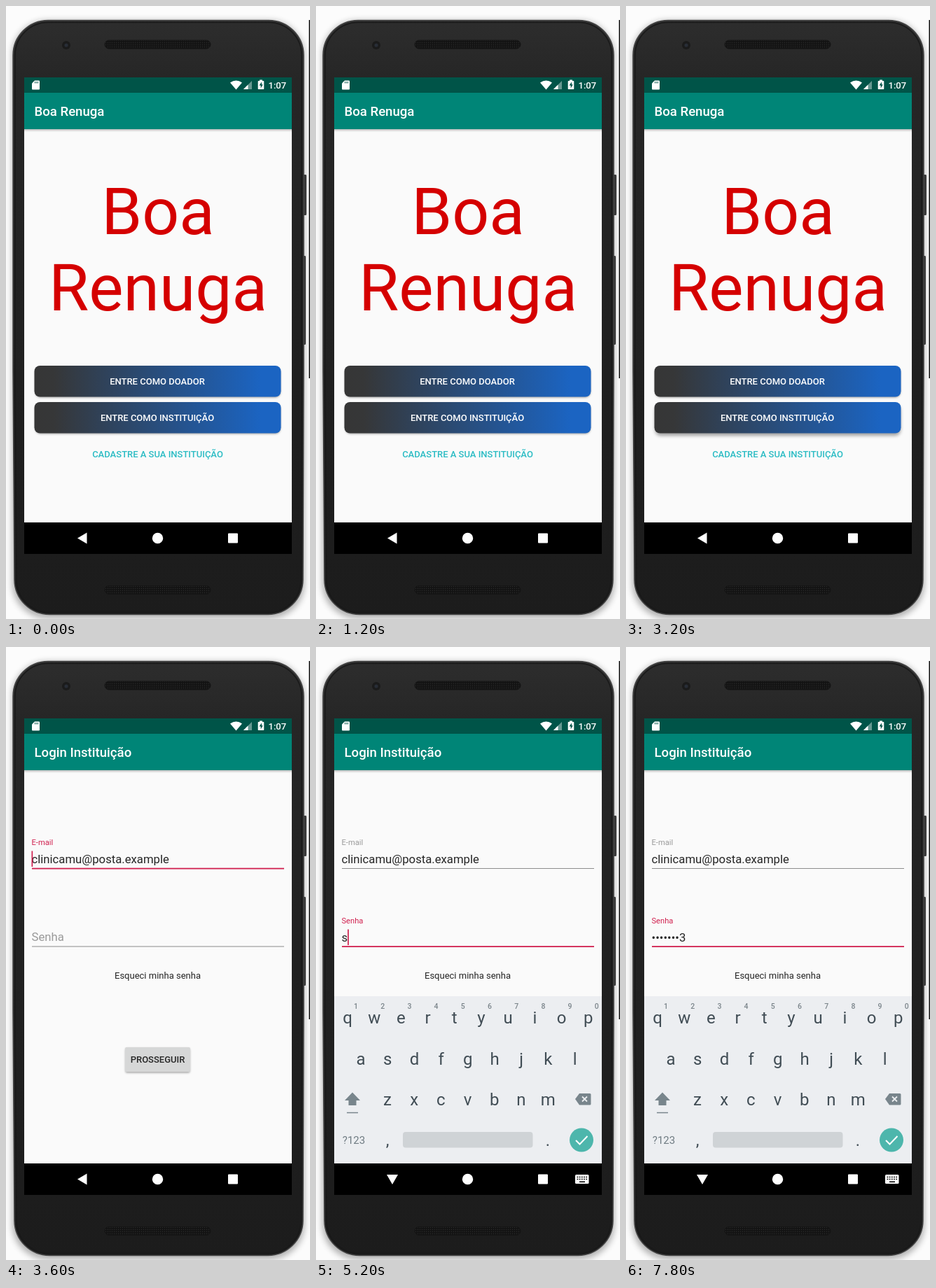
Recreate the animation shown at these times as an HTML page. Size 434x876 px, loop 8000 ms.

```html
<!DOCTYPE html>
<html lang="pt">
<head>
<meta charset="utf-8">
<title>Boa Renuga</title>
<style>
  html, body { margin: 0; width: 100%; height: 100%; overflow: hidden; background: #fcfcfc; }
  svg { display: block; width: 100vw; height: 100vh; font-family: Roboto, sans-serif; }
  text { white-space: pre; }
  .mid { text-anchor: middle; }
  .bold { font-weight: 500; }
  .btn { font-size: 13px; font-weight: 500; text-anchor: middle; }
  .label { font-size: 11.15px; }
  .field { font-size: 16.7px; fill: #252525; }
  .key { font-size: 24px; fill: #414d55; text-anchor: middle; }
  .hint { font-size: 10.5px; font-weight: 500; fill: #7b858b; text-anchor: middle; }
</style>
</head>
<body>
<svg viewBox="0 0 434 876">
  <defs>
    <linearGradient id="body" x1="0" y1="0" x2="0" y2="1">
      <stop offset="0" stop-color="#2d2d2d"/>
      <stop offset=".1" stop-color="#262626"/>
      <stop offset=".6" stop-color="#202020"/>
      <stop offset="1" stop-color="#1c1c1c"/>
    </linearGradient>
    <linearGradient id="blue">
      <stop offset="0" stop-color="#363636"/>
      <stop offset=".08" stop-color="#363738"/>
      <stop offset=".92" stop-color="#1b64c2"/>
    </linearGradient>
    <linearGradient id="drop" x1="0" y1="0" x2="0" y2="1">
      <stop offset="0" stop-opacity=".24"/>
      <stop offset="1" stop-opacity="0"/>
    </linearGradient>
    <pattern id="mesh" width="3" height="3" patternUnits="userSpaceOnUse">
      <rect width="3" height="3" fill="#131313"/>
      <circle cx="1.5" cy="1.5" r=".7" fill="#2b2b2b"/>
    </pattern>
    <filter id="soft" x="-20%" y="-50%" width="140%" height="200%"><feGaussianBlur stdDeviation="1.5"/></filter>
    <filter id="softer" x="-20%" y="-50%" width="140%" height="200%"><feGaussianBlur stdDeviation="2.8"/></filter>
    <filter id="wide" x="-10%" y="-10%" width="120%" height="120%"><feGaussianBlur stdDeviation="5"/></filter>
  </defs>

  <rect width="434" height="876" fill="#fcfcfc"/>
  <rect x="9" y="21" width="417" height="854" rx="50" opacity=".3" filter="url(#wide)"/>
  <rect x="432.5" y="20" width="1.5" height="512" fill="#111"/>
  <path d="M423 241h5q1 0 1 2v54q0 2-1 2h-5zM423 357h4q1 0 1 2v123q0 2-1 2h-4z" fill="#3a3a3a"/>
  <path d="M60 20.5H375A50 50 0 0 1 425 70.5V520L424 820A50 50 0 0 1 374 869.5H62A50 50 0 0 1 12 820L10 520V70.5A50 50 0 0 1 60 20.5Z" fill="url(#body)" stroke="#444" stroke-width="1.5"/>
  <path d="M60 23.5H375A47 47 0 0 1 422 70.5V520L421 820A47 47 0 0 1 374 866.5H62A47 47 0 0 1 15 820L13 520V70.5A47 47 0 0 1 60 23.5Z" fill="none" stroke="#191919" stroke-width="1.5"/>
  <circle cx="86" cy="56" r="6" fill="#1b1b1b"/>
  <circle cx="86" cy="56" r="2.6" fill="#282d36"/>
  <rect x="141" y="49" width="151" height="12" rx="6" fill="url(#mesh)" stroke="#151515"/>
  <rect x="141" y="828.5" width="151" height="12" rx="6" fill="url(#mesh)" stroke="#151515"/>

  <rect x="26" y="102" width="382" height="681" fill="#fafafa"/>
  <rect x="26" y="102" width="382" height="22" fill="#005448"/>
  <rect x="26" y="124" width="382" height="52" fill="#008577"/>
  <rect x="26" y="176" width="382" height="4" fill="url(#drop)"/>
  <g fill="#fff">
    <path d="M41 106.5h6q1 0 1 1v11q0 1-1 1h-9q-1 0-1-1v-8z"/>
    <path d="M41.5 108v2.5M43.5 108v2.5M45.5 108v2.5" stroke="#005448" stroke-width=".9"/>
    <path d="M320 109.5Q328.5 103.5 337 109.5L328.5 119.5z"/>
    <path d="M339 119L351 107V119z" opacity=".4"/>
    <path d="M339 119L345.5 112.5V119z"/>
    <path d="M362 107v-1.5h4v1.5h1.5q.8 0 .8.8v10.4q0 .8-.8.8h-7q-.8 0-.8-.8v-10.4q0-.8.8-.8z"/>
    <path d="M365 108.5L361.5 113.5H363.7V117.5L366.8 112.3H365z" fill="#005448"/>
    <text class="bold" x="374.5" y="118" font-size="13">1:07</text>
    <text class="bold" id="title" x="40.5" y="157" font-size="18.6"></text>
  </g>

  <g id="home">
    <g class="mid" font-size="93" fill="#d50000">
      <text x="217" y="326">Boa</text>
      <text x="217" y="435">Renuga</text>
    </g>
    <rect x="41.5" y="516" width="350.5" height="43.5" rx="8" opacity=".36" filter="url(#soft)"/>
    <rect id="lift" x="41.5" width="350.5" height="43.5" rx="8" opacity=".36"/>
    <rect x="40.5" y="514" width="352" height="44.5" rx="8" fill="url(#blue)"/>
    <rect x="40.5" y="566" width="352" height="44.5" rx="8" fill="url(#blue)"/>
    <text class="btn" x="216" y="541" fill="#fff">ENTRE COMO DOADOR</text>
    <text class="btn" x="216" y="593.3" fill="#fff">ENTRE COMO INSTITUIÇÃO</text>
    <text class="btn" x="216.5" y="645.3" fill="#2bbcc4">CADASTRE A SUA INSTITUIÇÃO</text>
  </g>

  <g id="login">
    <text class="label" id="mailLabel" x="36.5" y="283">E-mail</text>
    <text class="field" x="36.5" y="309">clinicamu@posta.example</text>
    <rect id="mailLine" x="37" width="360"/>
    <text id="passLabel" x="36.5">Senha</text>
    <text class="field" id="pass" x="36.5" y="420.5"></text>
    <rect id="passLine" x="37" width="360"/>
    <rect id="caret" width="1.7" height="22.5" fill="#d0214f"/>
    <text class="mid" x="216.5" y="474" font-size="13" fill="#252525">Esqueci minha senha</text>
    <rect x="170.5" y="573.5" width="92" height="35" rx="2" opacity=".35" filter="url(#soft)"/>
    <rect x="170" y="572" width="93" height="35" rx="2" fill="#d6d7d7"/>
    <text class="btn" x="216.5" y="594" fill="#252525">PROSSEGUIR</text>
  </g>

  <g id="keyboard">
    <rect x="26" y="499" width="382" height="239" fill="#eceef1"/>
    <g id="keys"></g>
    <path d="M52 636.5L63 648H57.5V655H46.5V648H41z" fill="#78858c"/>
    <path d="M44 665.5h16" stroke="#78858c" stroke-width="1.5"/>
    <path d="M370 646L376 638H391q1.5 0 1.5 1.5V653q0 1.5-1.5 1.5H376z" fill="#78858c"/>
    <path d="M380 642.5l7 7M387 642.5l-7 7" stroke="#eceef1" stroke-width="1.8"/>
    <text class="mid" x="54" y="710" font-size="15" fill="#6f7b82">?123</text>
    <rect x="124" y="693" width="185.5" height="22.5" rx="4" fill="#cfd3d6"/>
    <circle cx="379" cy="704.5" r="17" fill="#4db6ac"/>
    <path d="M371 705l5.5 5.5L387.5 699" fill="none" stroke="#fff" stroke-width="2"/>
  </g>

  <rect x="26" y="738" width="382" height="45" fill="#000"/>
  <g fill="#fff">
    <path id="back"/>
    <circle cx="216.5" cy="760.5" r="7.7"/>
    <rect x="317" y="753.5" width="14" height="14" rx="1"/>
    <g id="switcher">
      <rect x="370" y="754" width="19.5" height="13" rx="1.5"/>
      <path d="M372.5 757.5h15M372.5 760.5h15" stroke="#000" stroke-width="1.6" stroke-dasharray="1.8 1.4"/>
      <path d="M376 764.3h8" stroke="#000" stroke-width="1.6"/>
    </g>
  </g>
</svg>
<script>
const LOOP = 8000, STEP = 200;
const PRESS = 3200, OPEN = 3600, FOCUS = 4200, KEYBOARD = 4400;
const TYPED = [
  [5000, 's'], [5400, 'e'], [5800, 'n'], [6200, 'h'],
  [6600, 'a'], [6800, '1'], [7000, '2'], [7200, '3']
];
const RED = '#d0214f', GREY = '#9a9a9a';
const $ = id => document.getElementById(id);
const set = (id, attrs) => {
  for (const name in attrs) $(id).setAttribute(name, attrs[name]);
};
const show = (id, on) => { $(id).style.display = on ? '' : 'none'; };

function addKey(x, y, char, type = 'key') {
  const key = document.createElementNS($('keys').namespaceURI, 'text');
  key.setAttribute('class', type);
  key.setAttribute('x', x);
  key.setAttribute('y', y);
  key.textContent = char;
  $('keys').append(key);
}

const PITCH = 38.2;
[['qwertyuiop', 45, 538], ['asdfghjkl', 64, 596.5], ['zxcvbnm', 102, 655]].forEach(([row, x, y]) =>
  [...row].forEach((char, i) => addKey(x + i * PITCH, y, char)));
[...'1234567890'].forEach((digit, i) => addKey(57 + i * PITCH, 517, digit, 'hint'));
addKey(102, 713, ',');
addKey(331, 713, '.');

function underline(id, y, focused) {
  set(id, { y: focused ? y - 0.3 : y, height: focused ? 1.8 : 1, fill: focused ? RED : '#8c8c8c' });
}

function drawLogin(t) {
  const focused = t >= FOCUS;
  set('mailLabel', { fill: focused ? GREY : RED });
  set('passLabel', { y: focused ? 394.5 : 420, fill: focused ? RED : GREY, 'font-size': focused ? 11.15 : 16.7 });
  underline('mailLine', 316, !focused);
  underline('passLine', 427.5, focused);

  const typed = TYPED.filter(([time]) => time <= t);
  const [lastTime, lastChar] = typed.at(-1) || [focused ? FOCUS : OPEN, ''];
  $('pass').textContent = '•'.repeat(Math.max(0, typed.length - 1)) + lastChar;
  const end = typed.length ? $('pass').getComputedTextLength() : 0;
  set('caret', { x: 36.5 + end, y: focused ? 403.5 : 291.5 });
  show('caret', (t - lastTime) % 1000 < 500);
}

function draw(t) {
  const home = t < OPEN, keyboard = t >= KEYBOARD, pressed = t >= PRESS;
  show('home', home);
  show('login', !home);
  show('keyboard', keyboard);
  show('switcher', keyboard);
  $('title').textContent = home ? 'Boa Renuga' : 'Login Instituição';
  set('lift', { y: pressed ? 570.5 : 568, filter: pressed ? 'url(#softer)' : 'url(#soft)' });
  set('back', { d: keyboard ? 'M101 754H117L109 768z' : 'M102 760.5L115.5 752.5V768.5z' });
  if (!home) drawLogin(t);
}

const start = performance.now();
let shown = -1;
function tick() {
  const t = Math.floor((performance.now() - start) % LOOP / STEP) * STEP;
  if (t !== shown) draw(shown = t);
  requestAnimationFrame(tick);
}
tick();
</script>
</body>
</html>
```
